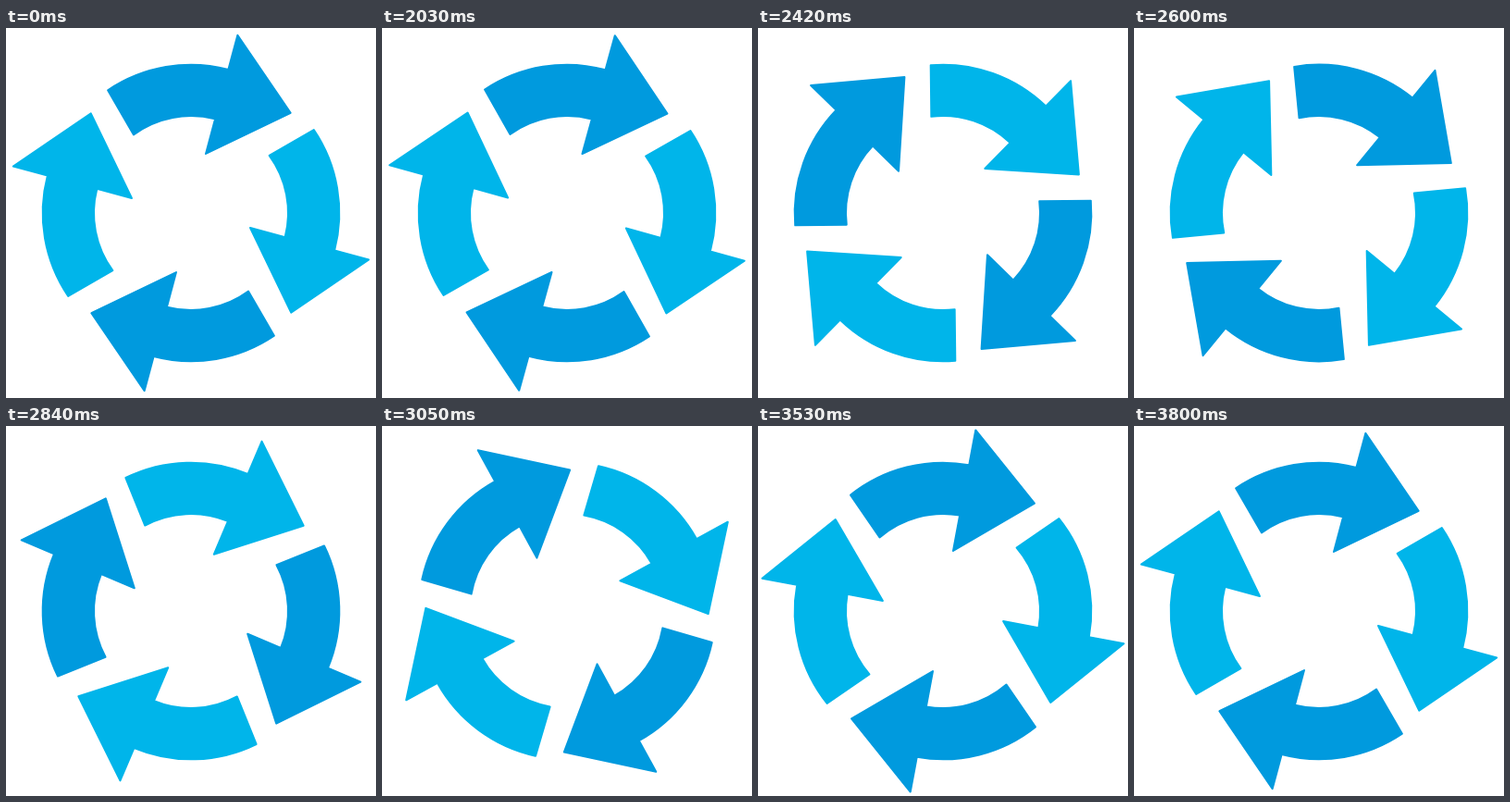
An HTML page for the animation above (3.83 s loop, 400 px wide and 400 px high).

```html
<!DOCTYPE html>
<html lang="en">
<head>
<meta charset="utf-8">
<title>Turning arrows</title>
<style>
  html, body { margin: 0; width: 100%; height: 100%; overflow: hidden; background: #fff; }
  svg { display: block; width: 100vw; height: 100vh; }
  .arrow { stroke-width: 2; stroke-linejoin: round; }
  .dark { fill: #009ade; stroke: #009ade; }
  .light { fill: #00b5ea; stroke: #00b5ea; }
</style>
</head>
<body>
<svg viewBox="-200 -200 400 400">
  <defs>
    <path id="arrow" d="M-121.2 -105 A160.3 160.3 0 0 1 -1.1 -160.3 V-198.7 L76 -132.4 L-1.1 -66 V-105 A105 105 0 0 0 -81.9 -65.7 Z"/>
  </defs>
  <g id="wheel" transform="rotate(15)">
    <use href="#arrow" class="arrow dark"/>
    <use href="#arrow" class="arrow light" transform="rotate(90)"/>
    <use href="#arrow" class="arrow dark" transform="rotate(180)"/>
    <use href="#arrow" class="arrow light" transform="rotate(270)"/>
  </g>
</svg>
<script>
  const LOOP = 3830, REST = 2000, TURN = 1800, TICK = 30, START_ANGLE = 15;
  const wheel = document.getElementById('wheel');

  const bezier = (a, b, s) => 3 * (1 - s) ** 2 * s * a + 3 * (1 - s) * s * s * b + s ** 3;

  // Same curve as cubic-bezier(.29, 0, .18, 1), solved by bisection
  function ease(x) {
    if (x <= 0 || x >= 1) return x <= 0 ? 0 : 1;
    let lo = 0, hi = 1;
    for (let i = 0; i < 30; i++) {
      const mid = (lo + hi) / 2;
      if (bezier(.29, .18, mid) < x) lo = mid; else hi = mid;
    }
    return bezier(0, 1, lo);
  }

  function draw(now) {
    // The turn advances in discrete ticks
    const ticks = Math.floor((now % LOOP - REST) / TICK);
    const angle = START_ANGLE + 360 * ease(ticks * TICK / TURN);
    wheel.setAttribute('transform', `rotate(${angle})`);
    requestAnimationFrame(draw);
  }
  requestAnimationFrame(draw);
</script>
</body>
</html>
```
